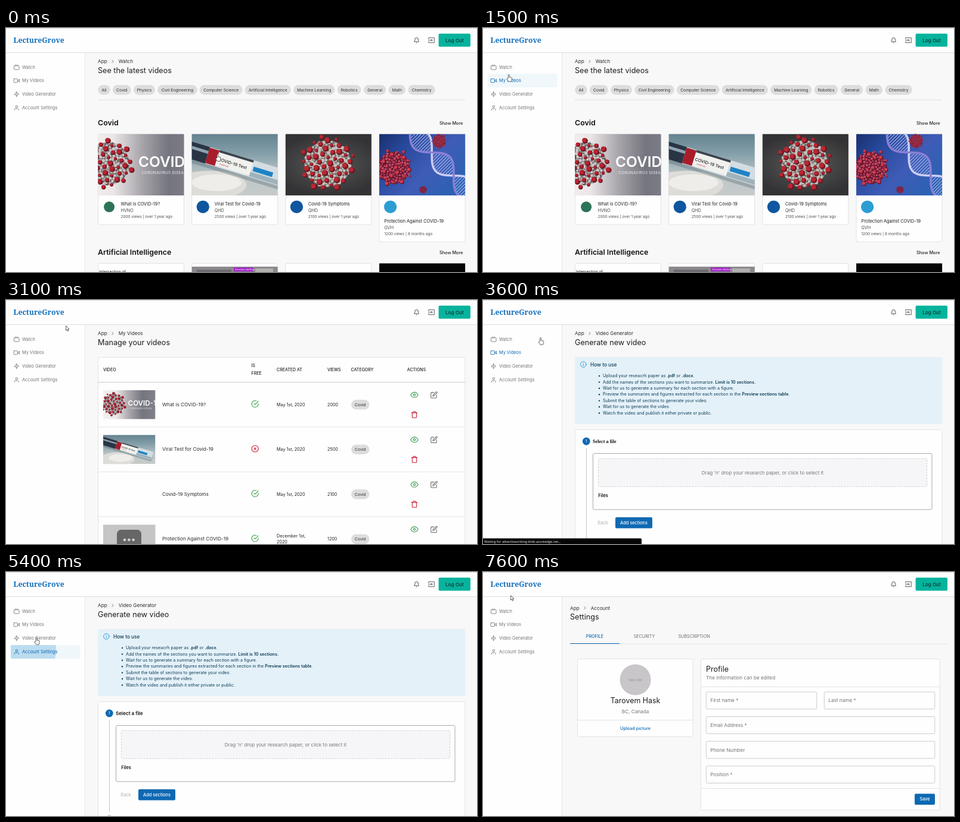
Animation, 790 px wide and 411 px high, one loop 8000 ms. Source, as an HTML page:

```html
<!DOCTYPE html>
<html lang="en">
<head>
<meta charset="utf-8">
<title>Video library</title>
<style>
html, body { margin: 0; width: 100%; height: 100%; overflow: hidden; background: #f8f8f8; }
#stage { display: block; width: 790px; height: 411px; font-family: Inter, sans-serif; }
#stage * { animation-duration: 8s; animation-iteration-count: infinite; animation-timing-function: step-end; }
.ic { fill: none; stroke: currentColor; stroke-width: 2; stroke-linecap: round; stroke-linejoin: round; }

/* pages */
.watch { animation-name: watch; }
.mine { animation-name: mine; }
.gen { animation-name: gen; }
.account { animation-name: account; }
@keyframes watch { 0% { opacity: 1 } 31.25%, 100% { opacity: 0 } }
@keyframes mine { 0% { opacity: 0 } 31.25% { opacity: 1 } 42.5%, 100% { opacity: 0 } }
@keyframes gen { 0% { opacity: 0 } 42.5% { opacity: 1 } 68.75%, 100% { opacity: 0 } }
@keyframes account { 0% { opacity: 0 } 68.75%, 100% { opacity: 1 } }

/* late web font on the step title */
.early { animation-name: early; }
.late { animation-name: late; }
@keyframes early { 0% { opacity: 1 } 47.5%, 100% { opacity: 0 } }
@keyframes late { 0% { opacity: 0 } 47.5%, 100% { opacity: 1 } }

/* sidebar */
.item { color: #747474; }
.item0 { animation-name: item0; }
.item1 { animation-name: item1; }
.item2 { animation-name: item2; }
.item3 { animation-name: item3; }
@keyframes item0 { 0%, 48.1%, 84.4%, 100% { color: #747474 } 45.6%, 74.4% { color: #0e69b3 } }
@keyframes item1 { 0%, 31.25%, 45.6%, 74.4%, 100% { color: #747474 } 12.5%, 43.75%, 71.25% { color: #0e69b3 } }
@keyframes item2 { 0%, 43.75%, 71.25%, 100% { color: #747474 } 40.6%, 68.1% { color: #0e69b3 } }
@keyframes item3 { 0%, 68.75%, 100% { color: #747474 } 64.4% { color: #0e69b3 } }
.glow1 { animation-name: glow1; }
.glow3 { animation-name: glow3; }
@keyframes glow1 { 0%, 31.25%, 100% { opacity: 0 } 13.75% { opacity: 1 } }
@keyframes glow3 { 0%, 68.75%, 100% { opacity: 0 } 65% { opacity: 1 } }
#stage .ripple { animation-name: ripple; animation-timing-function: linear; }
@keyframes ripple { 0%, 65% { transform: scale(0) } 67.5% { transform: scale(39) } 68.75% { transform: scale(58) } 68.76%, 100% { transform: scale(0) } }

/* status bar */
#stage .wait1 { animation-name: wait1; animation-timing-function: linear; }
.wait2 { animation-name: wait2; }
@keyframes wait1 { 0%, 24.4% { opacity: 0 } 27.5% { opacity: .76 } 28.75%, 31.2% { opacity: 1 } 31.25%, 100% { opacity: 0 } }
@keyframes wait2 { 0%, 50%, 100% { opacity: 0 } 42.5% { opacity: 1 } }

/* pointer */
#stage .pointer { animation-name: move; animation-timing-function: linear; }
@keyframes move {
  0%, 1.25% { transform: translate(351px, 212px) }
  13.75% { transform: translate(41px, 82px) }
  18.75% { transform: translate(39px, 78px) }
  22.5% { transform: translate(122px, 10px) }
  27.5% { transform: translate(133px, 2.5px) }
  33.75%, 38.65% { transform: translate(133px, 7px) }
  38.7%, 38.8% { transform: translate(100px, 43px) }
  41.25%, 42% { transform: translate(93px, 105px) }
  45% { transform: translate(92.5px, 63px) }
  48.75%, 58.75% { transform: translate(92px, 26px) }
  65% { transform: translate(46px, 127px) }
  67.5% { transform: translate(47px, 110px) }
  68.75% { transform: translate(49px, 98px) }
  75%, 82.5% { transform: translate(51px, 62px) }
  88.75%, 92.5% { transform: translate(52px, 48px) }
  95%, 100% { transform: translate(46px, 39px) }
}
.hand { animation-name: hand; }
.arrow { animation-name: arrow; }
@keyframes hand { 0%, 12.5%, 40%, 60.6% { opacity: 1 } 7.5%, 31.25%, 47.5%, 83.75%, 100% { opacity: 0 } }
@keyframes arrow { 0%, 12.5%, 40%, 60.6% { opacity: 0 } 7.5%, 31.25%, 47.5%, 83.75%, 100% { opacity: 1 } }
</style>
</head>
<body>
<svg id="stage" viewBox="0 0 790 411"></svg>
<script>
const BLUE = '#0e69b3', INK = '#1d1d1d', SOFT = '#747474', LINE = '#e2e2e2';

const text = (x, y, size, s, fill = INK, more = '') =>
  `<text x="${x}" y="${y}" font-size="${size}" fill="${fill}" ${more}>${s}</text>`;
const mid = (x, y, size, s, fill, more = '') =>
  text(x, y, size, s, fill, 'text-anchor="middle" ' + more);
const rect = (x, y, w, h, fill, more = '') =>
  `<rect x="${x}" y="${y}" width="${w}" height="${h}" fill="${fill}" ${more}/>`;
const dot = (x, y, r, fill, more = '') =>
  `<circle cx="${x}" cy="${y}" r="${r}" fill="${fill}" ${more}/>`;
const hline = (x1, x2, y, c = LINE, w = 1) =>
  `<path d="M${x1} ${y}H${x2}" stroke="${c}" stroke-width="${w}"/>`;
const panel = (x, y, w, h) => rect(x, y, w, h, '#fefefe', `rx="2" stroke="${LINE}"`);
const W5 = 'font-weight="500"', W6 = 'font-weight="600"';

const icons = {
  tv: '<rect x="2" y="7" width="20" height="15" rx="2"/><path d="M17 2l-5 5-5-5"/>',
  video: '<path d="M23 7l-7 5 7 5z"/><rect x="1" y="5" width="15" height="14" rx="2"/>',
  zap: '<path d="M13 2L3 14h9l-1 8 10-12h-9z"/>',
  user: '<path d="M20 21v-2a4 4 0 0 0-4-4H8a4 4 0 0 0-4 4v2"/><circle cx="12" cy="7" r="4"/>',
  bell: '<path d="M18 8A6 6 0 0 0 6 8c0 7-3 9-3 9h18s-3-2-3-9M13.7 21a2 2 0 0 1-3.4 0"/>',
  enter: '<path d="M2 8V3h20v18H2v-5M2 12h13M11 8l4 4-4 4"/>',
  eye: '<path d="M1 12s4-8 11-8 11 8 11 8-4 8-11 8S1 12 1 12z"/><circle cx="12" cy="12" r="3"/>',
  edit: '<path d="M11 4H4a2 2 0 0 0-2 2v14a2 2 0 0 0 2 2h14a2 2 0 0 0 2-2v-7M18.5 2.5a2.1 2.1 0 0 1 3 3L12 15l-4 1 1-4z"/>',
  trash: '<path d="M3 6h18M19 6v14a2 2 0 0 1-2 2H7a2 2 0 0 1-2-2V6M8 6V4a2 2 0 0 1 2-2h4a2 2 0 0 1 2 2v2"/>',
  check: '<path d="M22 11v1a10 10 0 1 1-5.9-9.1M22 4L12 14l-3-3"/>',
  cross: '<circle cx="12" cy="12" r="10"/><path d="M15 9l-6 6M9 9l6 6"/>',
  info: '<circle cx="12" cy="12" r="10"/><path d="M12 16.5V11M12 7.5v.1"/>',
  next: '<path d="M9 18l6-6-6-6"/>'
};
const icon = (name, cx, cy, k, color) =>
  `<g class="ic" ${color ? `color="${color}"` : ''} transform="translate(${cx} ${cy}) scale(${k}) translate(-12 -12)">${icons[name]}</g>`;

// grainy ball with knobs, both spread by the golden angle
function virus(cx, cy, r, body, light, shade, knob, n) {
  let out = dot(cx, cy, r, body);
  const spread = (count, reach, size, turn, draw) => {
    for (let i = 0; i < count; i++) {
      const d = r * reach * Math.sqrt((i + .5) / count), a = i * 2.39996 + turn;
      const s = r * size * (1 - .2 * (i % 3));
      out += draw((cx + d * Math.cos(a)).toFixed(1), (cy + d * Math.sin(a)).toFixed(1), s.toFixed(1), a);
    }
  };
  spread(n * 2, .97, .085, 2, (x, y, s) => dot(x, y, s, shade));
  spread(n * 3, .98, .075, 1, (x, y, s) => dot(x, y, s, light));
  spread(n, 1.17, .13, 0, (x, y, s, a) => dot(x, y, s, '#6d1420') +
    dot(x - s * .25, y - s * .25, s * .78, knob));
  return out;
}

function helix(phase) {
  const pts = [];
  for (let i = 0; i <= 40; i++) {
    const t = i / 40, s = 12 * Math.sin(t * 9 + phase);
    pts.push((72 + t * 105 + s).toFixed(1) + ' ' + (-8 + t * 112 - s).toFixed(1));
  }
  return pts;
}
const [strandA, strandB] = [helix(0), helix(Math.PI)];
const rungs = strandA.map((p, i) => `M${p}L${strandB[i]}`).join('');
const strand = (pts, color) => `<path d="M${pts.join('L')}" fill="none" stroke="${color}" stroke-width="3.5"/>`;

const pics = [
  rect(0, 0, 185, 103.5, 'url(#mist)') +
    virus(37, 50, 36, '#8f8a8b', '#cdc7c7', '#5f5a5d', '#bb2230', 44) +
    text(88, 55.5, 24.5, 'COVID-19', '#fff', W6) +
    text(93.5, 67.3, 6.2, 'CORONAVIRUS DISEASE', '#eee', 'letter-spacing=".35"'),
  rect(0, 0, 185, 103.5, 'url(#lab)') +
    '<ellipse cx="50" cy="86" rx="62" ry="24" fill="#dddcd8"/><ellipse cx="62" cy="82" rx="42" ry="14" fill="#eeedea"/>' +
    '<g transform="translate(16 27) rotate(17)">' +
    rect(-24, -8, 192, 28, '#53666f', 'rx="8" opacity=".35"') +
    rect(-24, -15, 190, 29, '#d3dde2', 'rx="6"') + rect(-24, -15, 56, 29, '#2a3544') +
    rect(-24, -8, 56, 5, '#8fa3b1') + rect(32, -14, 17, 27, '#a91d2b') +
    rect(49, -14, 60, 26, '#f1f1ee') + rect(49, -15, 60, 4, '#3b444d') + text(51, 3, 7.2, 'COVID-19 Test', '#222', W5) +
    text(56, 9, 3.4, 'POSITIVE', '#b3202c') + rect(109, 5, 55, 8, '#9fb2bc') + rect(112, -5, 34, 8, '#1d83c6') + '</g>',
  rect(0, 0, 185, 103.5, 'url(#dark)') + virus(91, 50, 39, '#8d8986', '#c4c0bb', '#5d5957', '#ba2731', 50),
  rect(0, 0, 185, 103.5, 'url(#deep)') +
    `<path d="${rungs}" stroke="#b9c2f5" stroke-width="1.3" opacity=".8"/>` +
    strand(strandA, '#cfcdf6') + strand(strandB, '#8a7fd6') +
    virus(45, 57, 27, '#7d1c3a', '#c4536a', '#4e1430', '#d23c52', 32) +
    virus(121, 12, 11, '#8a2140', '#c4536a', '#4e1430', '#c93a50', 20) +
    virus(94, 94, 6, '#7a2145', '#b84a68', '#4e1430', '#bd3a55', 14)
];
const pic = (i, x, y, w, h) =>
  `<svg x="${x}" y="${y}" width="${w}" height="${h}" viewBox="0 0 185 103.5" preserveAspectRatio="xMidYMid slice">${pics[i]}</svg>`;

const grad = (id, stops, dir = '') => `<linearGradient id="${id}" ${dir}>` +
  stops.map((c, i) => `<stop offset="${i / (stops.length - 1)}" stop-color="${c}"/>`).join('') + '</linearGradient>';
const defs = '<defs>' +
  grad('mist', ['#f5f1f1', '#ebe6e7', '#a9a6ac', '#74757f', '#80818a']) +
  grad('lab', ['#648290', '#86a1ab', '#bcc6c7', '#c6cbca'], 'x2="0" y2="1"') +
  grad('deep', ['#16255c', '#26489a', '#3f5cb6', '#2b62b2'], 'x2="1" y2=".5"') +
  '<radialGradient id="dark"><stop stop-color="#5a5a5a"/><stop offset="1" stop-color="#333335"/></radialGradient>' +
  '<clipPath id="row"><rect x="8" y="123" width="116.5" height="23" rx="2"/></clipPath></defs>';

const head = (x, y, crumb, title) =>
  text(x, y, 8.2, 'App', '#2c2c2c') + icon('next', x + 25, y - 3, .36, '#444') +
  text(x + 34.7, y, 8.2, crumb, '#2c2c2c') + text(x, y + 16.1, 12.6, title);
const chip = (x, w, y, s) =>
  rect(x, y - 8.2, w, 16.4, '#dddddd', 'rx="8.2"') + mid(x + w / 2, y + 2.4, 6.75, s, '#2e2e2e');
const button = (x, y, w, h, s, size = 7.35) =>
  rect(x, y, w, h, BLUE, 'rx="2"') + mid(x + w / 2, y + h / 2 + 2.7, size, s, '#fff', W5);

function watchPage() {
  const chips = [['All', 154.3, 20.5], ['Covid', 178.8, 31], ['Physics', 214, 36], ['Civil Engineering', 254.2, 66.5],
    ['Computer Science', 324.7, 72], ['Artificial Intelligence', 400.5, 77.5], ['Machine Learning', 482, 69.5],
    ['Robotics', 555.6, 40], ['General', 600, 37.3], ['Math', 641.6, 28.5], ['Chemistry', 674.4, 45.5]];
  const cards = [['What is COVID-19?', 'HVNO', '2000 views | over 1 year ago', '#2c7458'],
    ['Viral Test for Covid-19', 'QHD', '2500 views | over 1 year ago', '#10559f'],
    ['Covid-19 Symptoms', 'QHD', '2100 views | over 1 year ago', '#10559f'],
    ['Protection Against COVID-19', 'GVH', '1200 views | 8 months ago', '#2c9dd3']];
  const cardX = i => 154.5 + 157.2 * i;
  let out = head(154, 59.4, 'Watch', 'See the latest videos');
  for (const [s, x, w] of chips) out += chip(x, w, 104.2, s);
  out += hline(154, 770, 121, '#dedede');
  [['Covid', 163.5], ['Artificial Intelligence', 381.9]].forEach(([s, y]) =>
    out += text(154, y, 12.4, s, '#111', W6) + text(727, y - .9, 7.3, 'Show More', '#222', W5));
  cards.forEach(([title, by, info, color], i) => {
    const x = cardX(i), last = i === 3, tx = x + (last ? 8.4 : 38), ty = last ? 328.2 : 299.2;
    out += panel(x, 178.5, 144, last ? 181.5 : 152.5) + pic(i, x, 178.5, 144, 103.5) +
      dot(x + 18.6, 301.3, i ? 10.6 : 9, color) + text(tx, ty, 7.35, title) +
      text(tx, ty + 10.7, 7.2, by, '#484848') + text(tx, ty + 20.6, 6.4, info, '#4f4f4f');
  });
  for (let i = 0; i < 4; i++) out += panel(cardX(i), 396.5, 144, 30);
  return out + text(156, 412.8, 6.6, 'Intersection of') +
    rect(311.7, 402, 144, 9, '#8b898d') + rect(320, 407, 58, 4, '#6f6d72') +
    rect(382, 403.5, 33, 6.5, '#a324c9') + text(384, 408.3, 3.6, 'Automatic labelling', '#fff') +
    rect(418, 405, 30, 6, '#b3b0b0') + rect(626.1, 396.5, 144, 15, '#050505');
}

function minePage() {
  const heads = [['VIDEO', 163], ['CREATED AT', 454], ['VIEWS', 539], ['CATEGORY', 578.5], ['ACTIONS', 672.7]];
  const rows = [['What is COVID-19?', 2000], ['Viral Test for Covid-19', 2500],
    ['Covid-19 Symptoms', 2100], ['Protection Against COVID-19', 1200]];
  let out = head(154, 59.4, 'My Videos', 'Manage your videos') + panel(154.5, 96.5, 615.5, 330);
  for (const [s, x] of heads) out += text(x, 119.7, 7, s, INK, W5);
  out += text(411.5, 113.4, 7, 'IS', INK, W5) + text(411.5, 125.9, 7, 'FREE', INK, W5) + hline(154, 770, 138.5, '#c9c9c9');
  rows.forEach(([title, views], i) => {
    const y = 176 + 75.5 * i;
    if (i < 2) out += pic(i, 163, y - 24.3, 87.5, 49);
    if (i === 3) {
      out += rect(163, 378.5, 87.5, 40, '#c5c5c5') + rect(186, 387, 41, 36, '#666', 'rx="7"');
      [199, 206.3, 213.6].forEach(x => out += dot(x, 404, 2.3, '#d2d2d2'));
    }
    out += text(262, y + 2.9, 8.2, title, '#2b2b2b');
    out += i === 1 ? icon('cross', 417.7, y - 1, .55, '#c9152f') : icon('check', 417.7, y - 1, .55, '#3c9c46');
    out += i === 3 ? text(454, 399.8, 7.2, 'December 1st,') + text(454, 410.3, 7.2, '2020')
      : text(454, y + 2.6, 7.2, 'May 1st, 2020');
    out += text(539, y + 2.6, 7.2, views) + chip(579, 30.5, y + .2, 'Covid') +
      icon('eye', 685, y - 16.2, .56, '#3f9f52') + icon('edit', 718, y - 16.2, .52, '#666') +
      icon('trash', 685, y + 17, .52, '#c9152f');
    if (i < 3) out += hline(154.5, 770, y + 38, '#e5e5e5');
  });
  return out;
}

function genPage() {
  const b = s => `<tspan font-weight="600">${s}</tspan>`, navy = '#0d3c57';
  const tips = [`Upload your reseacrh paper as ${b('.pdf')} or ${b('.docx')}.`,
    `Add the names of the sections you want to summarize. ${b('Limit is 10 sections.')}`,
    'Wait for us to generate a summary for each section with a figure.',
    `Preview the summaries and figures extracted for each section in the ${b('Preview sections table')}.`,
    'Submit the table of sections to generate your video.',
    'Wait for us to generate the video.',
    'Watch the video and publish it either private or public.'];
  let out = head(154, 59.4, 'Video Generator', 'Generate new video') +
    rect(154, 96, 616.5, 113, '#e4f1f8', 'rx="2"') + icon('info', 168.3, 108.5, .47, '#1d97dc') +
    text(180, 111.6, 8.3, 'How to use', navy, W5);
  tips.forEach((s, i) => {
    const y = 127.6 + 10.43 * i;
    out += dot(195, y + .3, 1.2, navy) + text(201, y + 2.6, 7.2, s, navy);
  });
  return out + panel(154.5, 218.5, 615.5, 210) +
    dot(173.3, 238, 6.4, BLUE) + mid(173.3, 240.4, 6.3, '1', '#fff') +
    text(184, 241.2, 8.2, 'Select a file', '#111', 'class="early" font-weight="700" font-family="Liberation Serif, serif"') +
    text(184, 241, 8.1, 'Select a file', '#111', `class="late" ${W6}`) +
    '<path d="M173.5 250V404" stroke="#c4c4c4"/>' + dot(173.3, 416.3, 6.4, '#9c9c9c') +
    rect(184.5, 258.5, 568.5, 94.5, '#fefefe', 'rx="2" stroke="#aaa"') +
    rect(193.5, 267, 551, 47.3, '#f6f6f8', 'rx="2" stroke="#cfcfcf" stroke-dasharray="3 2"') +
    mid(469, 294, 8.15, "Drag 'n' drop your research paper, or click to select it", '#777') +
    text(193.3, 332.2, 7.35, 'Files', '#111', W6) + text(192.3, 377.8, 7.4, 'Back', '#bcbcbc', W5) +
    button(222, 366, 62, 18.5, 'Add sections');
}

function accountPage() {
  const fields = [['First name *', 374, 202, 185.5], ['Last name *', 572, 202, 185.5], ['Email Address *', 374, 243.6, 383.5],
    ['Phone Number', 374, 285.2, 383.5], ['Position *', 374, 326.8, 383.5]];
  let out = head(146, 63.5, 'Account', 'Settings') +
    mid(187.5, 110.8, 7.2, 'PROFILE', BLUE, W5) + mid(270.5, 110.8, 7.2, 'SECURITY', '#6c6c6c') +
    mid(354, 110.8, 7.2, 'SUBSCRIPTION', '#6c6c6c') + hline(146, 779, 121, LINE) + hline(146, 229, 120.5, BLUE, 1.2) +
    panel(158.5, 146.5, 193.5, 131) + dot(255.6, 181.5, 26, '#c8c6c8') + mid(255.6, 183.6, 5, '100 x 100', '#858385') +
    mid(255.5, 220.7, 12.4, 'Tarovem Hask', INK) + mid(255.5, 237.6, 8.2, 'BC, Canada', SOFT) +
    hline(158.5, 352, 249.5) + mid(255.5, 265.9, 7.25, 'Upload picture', BLUE, W5) +
    panel(365.5, 146.5, 400.5, 254.5) + text(374, 168.4, 12.5, 'Profile') +
    text(374, 181.4, 8.2, 'The information can be edited', SOFT) + hline(365.5, 766, 193.5) + hline(365.5, 766, 364.5);
  for (const [s, x, y, w] of fields)
    out += rect(x + .3, y, w, 28.8, '#fefefe', 'rx="2" stroke="#cbcbcb"') + text(x + 7.3, y + 17.3, 8.2, s, SOFT);
  return out + button(724, 373.5, 34, 18.5, 'Save');
}

function chrome() {
  const items = [['Watch', 'tv'], ['My Videos', 'video'], ['Video Generator', 'zap'], ['Account Settings', 'user']];
  let out = rect(0, 0, 790, 41, '#fefefe') + rect(0, 41, 132.5, 370, '#fefefe') +
    hline(0, 790, .5, '#dcdcdc') + hline(0, 790, 41.5, '#dedede') + '<path d="M132.5 42V411" stroke="#e6e6e6"/>' +
    text(12.5, 25.2, 12.2, 'LectureGrove', '#126fbd', 'font-family="Noto Serif, serif" font-weight="700"') +
    icon('bell', 688.7, 20.8, .45, '#444') + icon('enter', 713.6, 20.5, .47, '#555') +
    rect(725.6, 9.5, 53.4, 22, '#06b39c', 'rx="2"') + mid(752.5, 23.5, 8.1, 'Log Out', '#14302f', W5) +
    rect(8, 77, 116.5, 23, '#f0f7fb', 'rx="2" class="glow1"') + rect(8, 123, 116.5, 23, '#f0f7fb', 'rx="2" class="glow3"') +
    '<g clip-path="url(#row)"><g transform="translate(45 132)"><circle class="ripple" r="1" fill="#bcdcef"/></g></g>';
  items.forEach(([s, name], i) => {
    const y = 65.8 + 22.9 * i;
    out += `<g class="item item${i}">${icon(name, 17.7, y, .43)}${text(27, y + 2.7, 7.35, s, 'currentColor')}</g>`;
  });
  return out;
}

const wait = (cls, host) => `<g class="${cls}"><path d="M0 401.5H264a2 2 0 0 1 2 2V411H0z" fill="#050505"/>` +
  text(2, 409, 5.6, `Waiting for ${host}...`, '#fff', 'font-family="Open Sans, sans-serif"') + '</g>';
const pointer = '<g class="pointer" stroke="#333" stroke-width=".8" stroke-linejoin="round" fill="#fff">' +
  '<path class="hand" d="M3 7V1.6a1 1 0 0 1 2 0V5l3 .6q1.2.3 1.1 1.6L8.7 10 8 12.4H3.6L1 8.6Q.3 7.2 1.4 7.2z"/>' +
  '<path class="arrow" d="M.4.4V8.2l1.8-1.6 1.3 2.9 1.3-.6L3.6 6.1H6z"/></g>';

const page = (cls, body) => `<g class="${cls}">${body}</g>`;
document.getElementById('stage').innerHTML = defs + rect(0, 0, 790, 411, '#f8f8f8') +
  page('watch', watchPage()) + page('mine', minePage()) + page('gen', genPage()) + page('account', accountPage()) +
  chrome() + wait('wait1', 'dev-eztbx6-9.us.auth0.com') + wait('wait2', 'advertiseonbing-blob.azureedge.net') + pointer;
</script>
</body>
</html>
```
